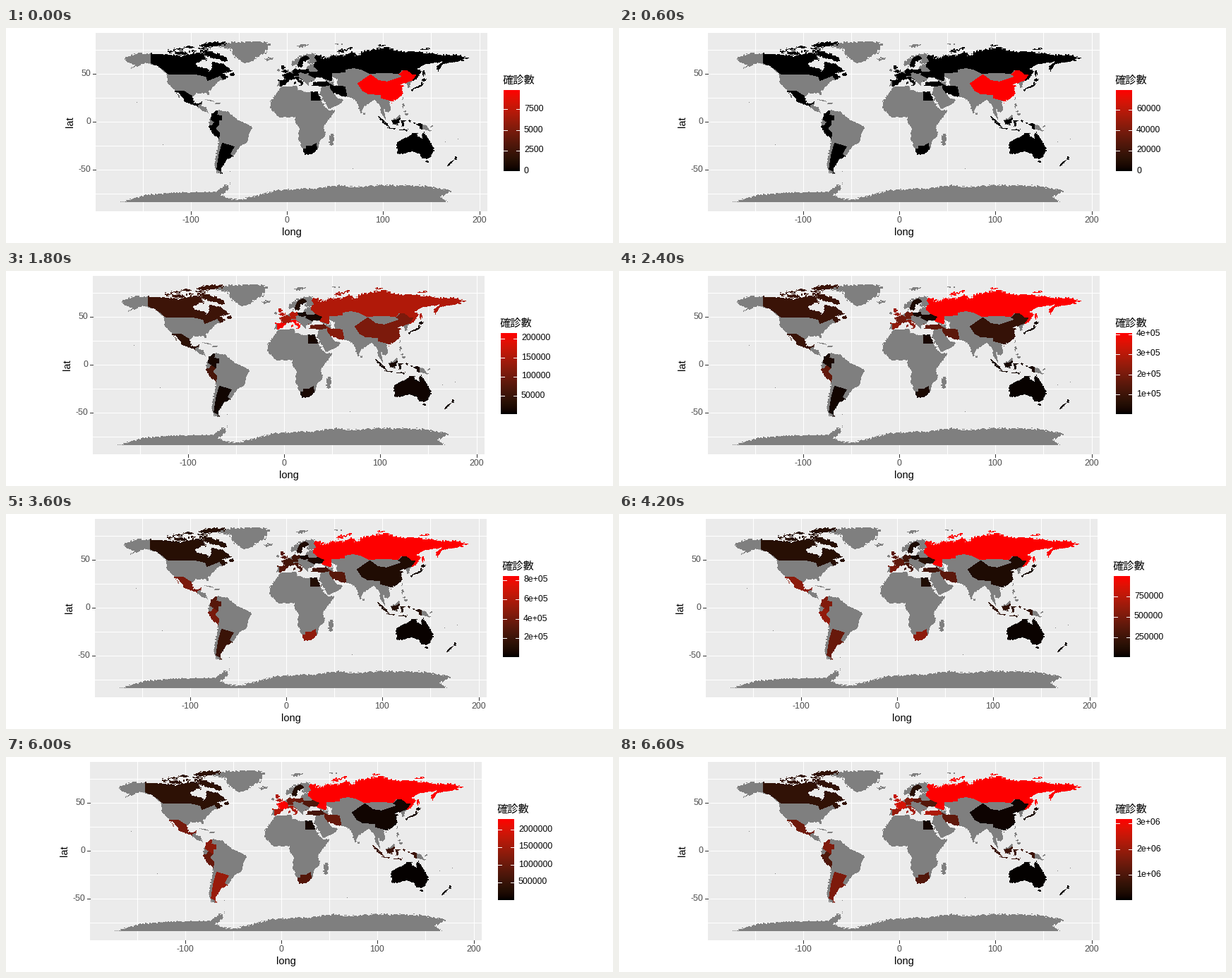
Write a matplotlib script that moves like this. It is 860 px wide and 305 px high and loops after 7200 ms.

```python
import numpy as np
import matplotlib.pyplot as plt
from matplotlib.animation import FuncAnimation
from matplotlib.patches import Rectangle
from matplotlib.path import Path

W, H, DPI = 860, 305, 100
SCALE = 1.3625
TOP, BOTTOM, PANEL_W = 7, 260, 555
LON0, LAT0 = 270.5, 125.5  # panel pixel of 0°, 0°
BAR_TOP, BAR_BOTTOM, BAR_W = 88, 203, 23

# Confirmed cases in thousands at the ends of KNOTS; months between are interpolated.
KNOTS = [2, 4, 6, 8, 10, 11]
CASES = {
    "China": [82, 84, 87, 91, 93, 96],
    "Russia": [2, 406, 840, 1167, 2296, 3159],
    "Italy": [106, 233, 247, 315, 1600, 2107],
    "Spain": [96, 239, 288, 769, 1648, 1928],
    "France": [52, 189, 225, 606, 2275, 2677],
    "Germany": [72, 183, 210, 292, 1070, 1760],
    "UK": [38, 256, 304, 455, 1630, 2496],
    "Turkey": [14, 164, 231, 318, 638, 2209],
    "Iran": [45, 151, 304, 457, 962, 1225],
    "Canada": [9, 92, 118, 160, 383, 584],
    "Mexico": [1, 90, 424, 743, 1114, 1426],
    "Colombia": [1, 29, 295, 829, 1317, 1643],
    "Peru": [1, 164, 414, 811, 963, 1015],
    "Argentina": [1, 17, 191, 751, 1424, 1625],
    "South Africa": [1, 33, 493, 674, 790, 1057],
    "Poland": [2, 24, 45, 91, 991, 1295],
    "Ukraine": [1, 24, 71, 213, 752, 1087],
    "Sweden": [4, 38, 80, 93, 260, 437],
    "Egypt": [1, 25, 94, 103, 116, 138],
    "Japan": [2, 17, 36, 84, 149, 239],
    "Indonesia": [2, 26, 108, 287, 539, 743],
    "Australia": [5, 7, 17, 27, 28, 28],
}
NAMES = list(CASES)
TOPS = [9.8, 79.3, 105.8, 213.4, 405.8, 647, 840, 993, 1167, 1606, 2296, 3159]
STEPS = [2500, 20000, 25000, 50000, 100000, 200000, 200000, 250000, 300000, 500000, 500000, 1000000]
SCIENTIFIC = {4, 5, 6, 8, 11}
PANEL_LEFT = {4: 127, 5: 126, 6: 123, 7: 119}

# Every panel pixel holds 0 for sea, 1 for land without data, or a country index + 2.
lon, lat = np.meshgrid((np.arange(PANEL_W) + .5 - LON0) / SCALE,
                       (LAT0 - np.arange(BOTTOM - TOP) - .5) / SCALE)
owner = np.zeros(lon.shape, int)
rng = np.random.default_rng(4)


def coast_noise():
    coarse = np.kron(rng.uniform(-1, 1, (127, 278)), np.ones((2, 2)))
    return coarse[:lat.shape[0], :lat.shape[1]] * np.where(abs(lat) > 62, 1, .45)


rough_lon, rough_lat = lon + 1.6 * coast_noise(), lat + coast_noise()


def inside(coords, x, y):
    path = Path(np.reshape(coords, (-1, 2)))
    return path.contains_points(np.column_stack([x.ravel(), y.ravel()])).reshape(x.shape)


def index(name):
    return NAMES.index(name) + 2 if name else 1


def land(*coords):
    owner[inside(coords, rough_lon, rough_lat)] = 1


def country(name, *coords):
    owner[(owner == 1) & inside(coords, lon, lat)] = index(name)


def isle(name, x, y, rx, ry, slope=0):
    """Ellipse sheared along a slope."""
    dx = rough_lon - x
    owner[(dx / rx) ** 2 + ((rough_lat - y - slope * dx) / ry) ** 2 < 1] = index(name)


def speck(x, y):
    owner[int(LAT0 - y * SCALE), int(LON0 + x * SCALE)] = 1


def build_map():
    # Americas
    land(-168, 66, -156, 71, -128, 70, -108, 68, -95, 71.5, -82, 69, -87, 64.5, -94, 60, -92, 57,
         -82, 55, -80, 51.5, -78, 55, -77, 62, -65, 59.5, -56, 52.5, -66, 50, -60, 46, -70, 42,
         -76, 36, -81, 31, -80.5, 25.5, -83, 29.5, -94, 29.5, -97.5, 26, -96, 18.8, -91, 18.6,
         -87, 21.4, -88.5, 16, -83.5, 15, -82, 9, -77.5, 8.5, -85.5, 10, -94, 16, -105.5, 20,
         -109, 26, -114.5, 31.5, -110, 23, -117, 32.5, -124, 40.5, -124, 48.5, -134, 58, -147, 61,
         -154, 58, -164, 54.5, -157, 58.5, -165, 61.5)
    land(-77.5, 8, -72, 12, -62, 10.6, -50, 1, -35.3, -5.5, -39, -13, -41, -22, -48.5, -26,
         -54, -34.5, -58, -38, -62.5, -40, -65.5, -45, -69, -51, -65.5, -54.8, -72, -54, -75, -47,
         -73.5, -37, -70.3, -18.5, -76, -14, -81, -5.5, -80, 1)
    country("Canada", -141, 75, -141, 60.3, -130, 55, -123, 49, -95, 49, -84, 46.5, -82.5, 42,
            -75, 45, -69, 47.3, -66, 43, -50, 43, -50, 75)
    country("Mexico", -120, 32.5, -106.5, 31.8, -97, 25.9, -85, 24, -87, 18, -92, 17.5, -92, 14, -110, 14)
    country("Colombia", -80, 9, -75, 13, -71, 12.5, -72, 7, -67.5, 6, -67, 1.2, -70, 1, -70, -4.2, -79, 1.5)
    country("Peru", -82, -3.4, -78, -4.5, -75, 0, -70, -3, -73.5, -7.5, -69, -12, -70.3, -19, -82, -19)
    country("Argentina", -67, -22, -57.7, -25, -54, -26, -58.3, -34, -50, -40, -60, -56, -68.6, -56,
            -68.6, -52, -73, -50, -70.5, -34)
    # Europe
    land(5, 59, 5, 62, 14, 68, 25, 71, 41, 67, 34, 65, 44, 66.5, 44, 68.5, 60, 69, 60, 46, 48, 46,
         48, 42, 41.5, 41.5, 37, 45.5, 31, 46, 28, 42, 23, 40.5, 22.5, 36.7, 19, 41, 13, 45.3,
         13.5, 43.5, 18.3, 40.2, 15.8, 38, 10, 44, 3, 43, -.3, 39, -5.5, 36, -9, 37, -9, 43.3,
         -1.5, 43.5, -4.5, 48.4, 2, 51, 8, 54, 10, 57.5, 11, 54, 20, 54.5, 24, 59, 29, 60, 22, 60.5,
         24.5, 65.5, 17.5, 61, 16, 56.5, 12.5, 56, 10.5, 59, 7, 58)
    # Asia
    land(60, 69, 69, 73, 73, 68, 81, 73.5, 104, 77.5, 113, 74, 128, 72.5, 140, 72.5, 160, 69.7,
         180, 69, 190, 66, 179, 62.5, 163, 59.8, 157, 51, 156, 57, 163, 62, 143, 59.3, 136, 54.7,
         141, 52, 135, 43.5, 129, 41, 129, 35.2, 126.5, 35, 125, 39.5, 118, 39, 122, 37, 119.5, 35,
         121.5, 29, 115, 22.7, 107, 20.5, 109, 12, 105, 9, 100.5, 13.5, 103.5, 2, 98.5, 8, 97, 16.5,
         91.5, 22.5, 80, 15, 77.5, 8, 73, 20, 67, 25, 57, 26.5, 49, 30, 52, 24.5, 59.8, 22.5,
         53, 16.5, 43.5, 12.8, 35, 28.5, 36, 36.5, 27, 37, 27, 40.5, 35, 42, 41.5, 41.5, 49, 41,
         49, 38, 53, 37, 53, 44, 48, 46, 60, 50)
    country("Russia", 31, 71, 29, 66, 31.5, 62.8, 28, 60, 28, 57, 34, 52, 40, 49.5, 37, 45, 48, 41.5,
            47, 50, 61, 51, 61, 54, 70, 55.3, 77, 54, 87, 49.2, 98, 50.5, 117, 49.6, 120, 53.3,
            126, 53, 130.5, 48.8, 135, 48.4, 130.7, 42.5, 140, 42, 200, 50, 200, 80, 31, 80)
    country("China", 73.6, 39.5, 82, 45.5, 87.5, 49.1, 96, 42.8, 105, 41.6, 119.5, 46.7, 116.5, 49,
            121, 53.3, 126, 53, 130.5, 48.8, 135, 48.4, 130.7, 42.5, 124, 40, 123, 30, 116, 20,
            108, 20, 108, 21.6, 98, 24, 98, 27.5, 85, 28.3, 79, 31.5)
    country("Iran", 44.5, 39.5, 49, 37.6, 61, 36.5, 63, 27, 61.5, 24, 52, 26, 48.5, 30, 45.5, 34)
    country("Turkey", 25, 42.3, 41.5, 42.3, 44.6, 39.7, 44, 37.2, 36, 36, 25, 36)
    country("Ukraine", 24, 51.7, 34, 52.2, 40, 49.5, 38, 46, 28.5, 45.4, 22.5, 48.4)
    country("Poland", 14.3, 55, 23, 55, 24, 50.5, 19, 49.5, 15, 51)
    country("Germany", 6, 51.5, 7, 55, 14.2, 55, 15, 51, 12.3, 50.2, 13, 47.6, 7.6, 47.6)
    country("Italy", 7, 45.8, 12.3, 47, 13.8, 45.5, 19, 41, 16, 37, 7.5, 43.5)
    country("France", -5, 49, 2, 52, 8, 49, 7, 43, 3, 42.4, -2, 43.3)
    country("Spain", -10, 44, -2, 44, 3.5, 42.4, 0, 36, -7.3, 36, -7, 42, -10, 42)
    country("Sweden", 11.2, 59, 14.5, 66, 20.3, 69, 24, 66, 17, 55, 12.6, 55)
    # Africa
    land(-6, 35.8, 10.5, 37, 11, 33.5, 20, 30.5, 32, 31.3, 35.5, 24, 39.5, 15.5, 43.5, 11.5,
         51, 11.8, 39, -5, 40.7, -15, 35, -20, 32.5, -28, 27, -34, 19, -34.5, 12, -17, 13.5, -9,
         9, 0, 9, 4.3, -8, 4.4, -17, 14, -16.5, 21, -10, 30)
    country("Egypt", 25, 22, 37, 22, 33, 32, 25, 32)
    country("South Africa", 16, -28.6, 20, -28, 20, -25, 25.5, -25.6, 31, -22.3, 33, -36, 16, -36)
    isle("", 46.8, -19, 2.3, 6.6, .4)
    # Borneo, New Guinea, Australia
    land(109, 1.5, 113, 3.2, 117, 7, 119, 5, 116, -3.5, 110.5, -3)
    land(131, -1, 134, -1, 135, -3, 138, -1.7, 145, -4.3, 150.5, -10.5, 143, -8.7, 138, -8, 138, -5)
    country("Indonesia", 108, 1, 115, 2, 117.5, 4.3, 141, 0, 141, -10, 108, -5)
    land(114, -22, 115.5, -34, 124, -33, 131, -31.5, 138, -33.5, 141, -38, 146.5, -39, 150, -37.5,
         153.5, -29, 149, -21, 145.3, -15, 142.5, -10.8, 140.5, -17.5, 135.5, -15, 136.5, -12,
         131, -12, 128, -15, 122, -18)
    country("Australia", 112, -10.5, 142.7, -10.5, 156, -26, 150, -41, 112, -36)
    # Greenland, Antarctica
    land(-73, 78.3, -60, 82, -32, 83.5, -17, 81, -22, 71, -43, 60, -54, 67, -58, 75)
    land(-178, -87, -168, -82.5, -150, -77, -116, -74.5, -74, -73, -57, -63, -62, -72, -68, -77,
         -58, -81, -45, -81, -9, -71.5, 31, -69.7, 55, -66.6, 72, -68.5, 97, -66.5, 141, -67,
         172, -72, 160, -79, 173, -87)
    owner[lat < -84] = 0
    # Islands
    isle("Canada", -75, 68.5, 14, 3, -.33)
    isle("Canada", -110, 71, 7, 2)
    isle("Canada", -121, 73, 3.5, 1.3)
    isle("Canada", -77, 80, 14, 2.3, .1)
    isle("Canada", -86, 75.5, 6, .8)
    isle("Canada", -111, 75.7, 6, .9)
    isle("Canada", -98, 73, 4, 1)
    isle("Canada", -101, 77.5, 5, .8)
    isle("Canada", -84, 64.7, 3, 1)
    isle("Canada", -56, 49, 3, 1.5)
    isle("Russia", 60, 74, 8, 1.2, .3)
    isle("Russia", 142.7, 50, .8, 4)
    isle("Russia", 100, 79, 4, .8)
    isle("Russia", 143, 75.3, 6, .7)
    isle("UK", -1.5, 52.3, 3, 1.8)
    isle("UK", -4, 56.2, 2, 2.4)
    isle("Italy", 14, 37.6, 1.5, .7)
    isle("Italy", 9, 40.1, .7, 1.3)
    isle("Japan", 136.5, 35.7, 5, 1, .4)
    isle("Japan", 140.8, 39, .9, 2.4)
    isle("Japan", 143, 43.4, 2.3, 1.6)
    isle("Japan", 131, 32.5, 1, 1.4)
    isle("China", 109.8, 19.2, 1, .8)
    isle("Indonesia", 101, -.2, 5.8, 1.5, -.95)
    isle("Indonesia", 110, -7.3, 4.7, .6, -.2)
    isle("Indonesia", 120.7, -2.3, 1.2, 3.2)
    isle("Indonesia", 122, .8, 2.7, .5, .1)
    isle("Indonesia", 121, -8.6, 4, .5)
    isle("Indonesia", 125.3, -9.2, 1.8, .5, .4)
    isle("Indonesia", 128, .7, .7, 1.2)
    isle("Australia", 146.7, -42, 1.5, 1.2)
    isle("Australia", 176, -38.5, 1.6, 1.8, -.6)
    isle("Australia", 170.5, -43.5, 3.2, 1.1, .9)
    isle("", -18.7, 65, 5, 1.3)
    isle("", 17, 79, 6, 1.2, .1)
    isle("", 55, 80.5, 6, .4)
    isle("", -8, 53.3, 1.7, 1.5)
    isle("", -79.5, 21.7, 5, .5, -.25)
    isle("", -71.3, 18.9, 2.7, .8)
    isle("", 80.7, 7.6, .8, 1.5)
    isle("", 121, 23.7, .6, 1.2)
    isle("", 121.2, 16.3, 1, 2.2)
    isle("", 123.3, 10.6, 1.6, .8)
    isle("", 124.7, 7.5, 1.5, 1.2)
    isle("", 150.5, -5.3, 2, .5, .3)
    speck(-155.5, 19.7)
    speck(-128.5, -24)
    speck(-59, -51.8)
    speck(69, -49.4)
    speck(165.5, -21.3)
    speck(178, -18)


def ramp(t):
    """Black to red, interpolated in CIE Lab."""
    t = np.asarray(t, float)
    fy = (53.24 * t + 16) / 116
    f = np.stack([fy + 80.09 * t / 500, fy, fy - 67.2 * t / 200], axis=-1)
    xyz = np.where(f > 6 / 29, f ** 3, 3 * (6 / 29) ** 2 * (f - 4 / 29)) * [.9505, 1, 1.089]
    to_rgb = np.array([[3.2406, -1.5372, -.4986], [-.9689, 1.8758, .0415], [.0557, -.204, 1.057]])
    rgb = np.clip(xyz @ to_rgb.T, 0, 1)
    return np.clip(np.where(rgb > .0031308, 1.055 * rgb ** (1 / 2.4) - .055, 12.92 * rgb), 0, 1)


def shares(month):
    """Each country's count relative to the largest one."""
    if month < 2:
        return np.array([float(name == "China") for name in NAMES])
    counts = np.array([np.interp(month, KNOTS, np.sqrt(v)) ** 2 for v in CASES.values()])
    return counts / counts.max()


build_map()
fig = plt.figure(figsize=(W / DPI, H / DPI), dpi=DPI, facecolor="white")
ax = fig.add_axes([0, 0, 1, 1])


def text(x, y, s, px=12.4, color="black", **kw):
    kw = {"family": "Liberation Sans", "ha": "center", "va": "center", **kw}
    ax.text(x, y, s, fontsize=px * 72 / DPI, color=color, **kw)


def line(xs, ys, color="white"):
    ax.plot(xs, ys, color=color, lw=72 / DPI, antialiased=False, solid_capstyle="butt")


def draw_panel(left, month):
    x0, y0, right = left + LON0, TOP + LAT0, left + PANEL_W
    ax.add_patch(Rectangle((left, TOP), PANEL_W, BOTTOM - TOP, fc="#ebebeb", lw=0))
    for deg in range(-150, 201, 50):
        x = np.floor(x0 + deg * SCALE) + .5
        line([x, x], [TOP, BOTTOM])
        if deg % 100 == 0:
            line([x, x], [BOTTOM, BOTTOM + 4], "#333333")
            text(x, 273.5, deg, color="#4d4d4d")
    for deg in range(-75, 76, 25):
        y = np.floor(y0 - deg * SCALE) + .5
        line([left, right], [y, y])
        if deg % 50 == 0:
            line([left - 4, left], [y, y], "#333333")
            text(left - 7, y + .5, deg, color="#4d4d4d", ha="right")
    colors = np.ones((len(NAMES) + 2, 4))
    colors[0] = 0
    colors[1, :3] = 127 / 255
    colors[2:, :3] = ramp(shares(month))
    ax.imshow(colors[owner], extent=(left, right, BOTTOM, TOP), aspect="auto",
              interpolation="nearest", zorder=3)
    text(x0 + 7, 290, "long", 14.67)
    text(left - 36, 133, "lat", 14.67, rotation=90)


def draw_legend(x, breaks, labels, top):
    text(x - 1, 74, "確診數", 15.3, family="Noto Sans CJK JP", ha="left")
    ax.imshow(ramp(np.linspace(1, 0, BAR_BOTTOM - BAR_TOP))[:, None], aspect="auto",
              extent=(x, x + BAR_W, BAR_BOTTOM, BAR_TOP))
    for value, label in zip(breaks, labels):
        y = np.floor(BAR_BOTTOM - (BAR_BOTTOM - BAR_TOP) * value / top) + .5
        line([x, x + 5], [y, y])
        line([x + BAR_W - 5, x + BAR_W], [y, y])
        text(x + 29, y, label, ha="left")


def draw(month):
    ax.clear()
    ax.axis("off")
    top, step = TOPS[month] * 1000, STEPS[month]
    breaks = range(0 if month < 2 else step, int(top) + 1, step)
    labels = [f"{b:.0e}" if month in SCIENTIFIC else str(b) for b in breaks]
    left = PANEL_LEFT[max(map(len, labels))]
    draw_panel(left, month)
    draw_legend(left + 578, breaks, labels, top)
    ax.set_xlim(0, W)
    ax.set_ylim(H, 0)
    return []


anim = FuncAnimation(fig, draw, frames=12, interval=600, init_func=lambda: draw(0), repeat=True)
plt.show()
```
